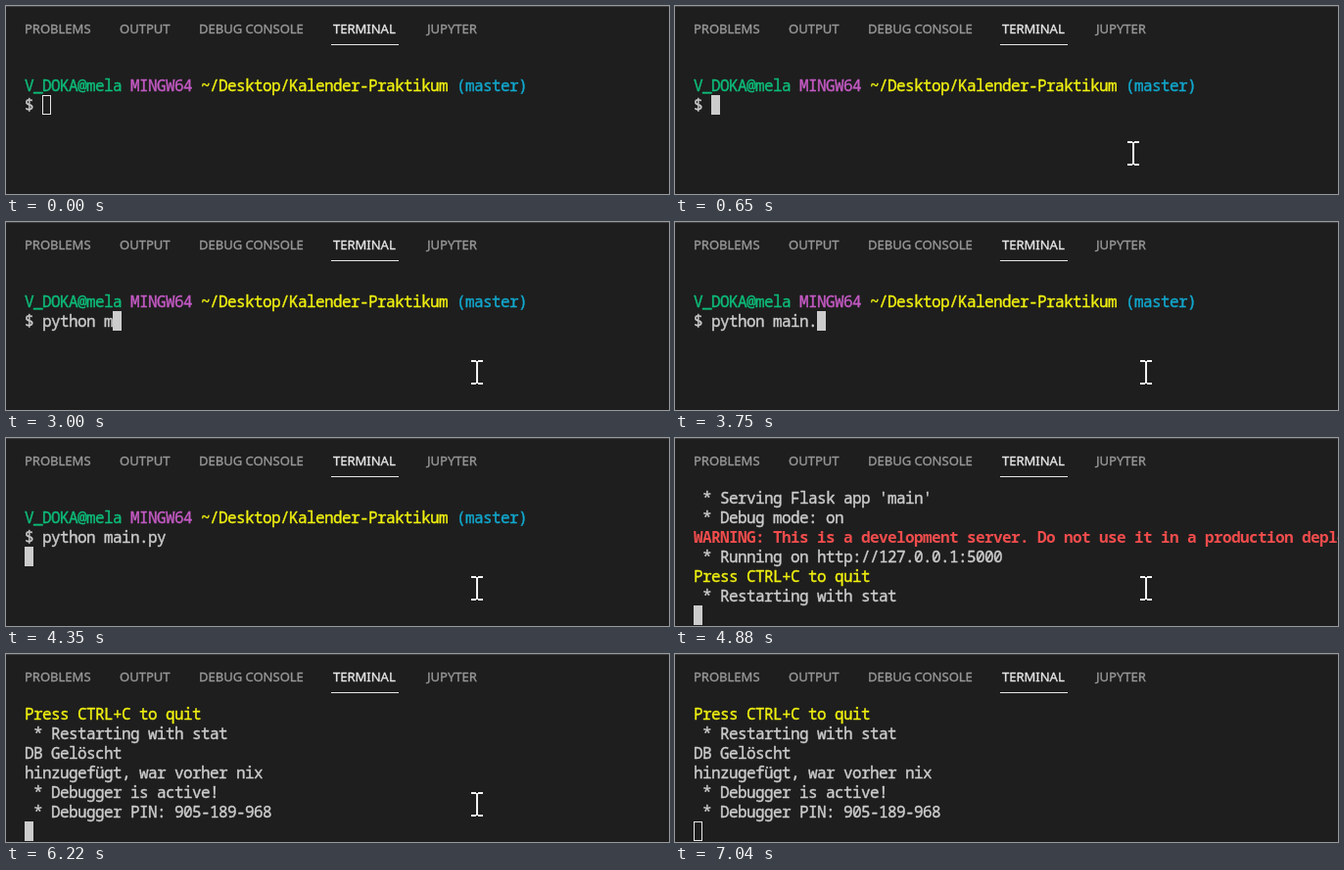
Animation of 677 by 192 pixels, one loop 7.11 s. Source, as an HTML page with a canvas:

```html
<!DOCTYPE html>
<html lang="en">
<head>
<meta charset="utf-8">
<title>Terminal</title>
<style>
  html, body { margin: 0; width: 677px; height: 192px; overflow: hidden; background: #1e1e1e; }
  canvas { display: block; }
</style>
</head>
<body>
<canvas id="stage" width="677" height="192"></canvas>
<script>
const ctx = document.getElementById('stage').getContext('2d');
const LOOP = 7110, LEFT = 19, TOP = 51, CELL = 9, ROW = 20, ROWS = 7;
const BG = '#1e1e1e', FG = '#cccccc', BRIGHT = '#e7e7e7', GREEN = '#0dbc79', PINK = '#c45ac4',
      YELLOW = '#f0f010', CYAN = '#11a8cd', RED = '#f14c4c';
const MONO = '16px "Noto Sans Mono", "DejaVu Sans Mono", monospace';
const SANS = '13px "Noto Sans", "Open Sans", sans-serif';

const TABS = [['PROBLEMS', 19], ['OUTPUT', 116], ['DEBUG CONSOLE', 197], ['TERMINAL', 334], ['JUPYTER', 430]];

// A line is a list of [text, colour, bold] runs.
const line = (text, color = FG, bold = false) => [[text, color, bold]];
const PROMPT = [['V_DOKA@mela ', GREEN], ['MINGW64 ', PINK],
                ['~/Desktop/Kalender-Praktikum ', YELLOW], ['(master)', CYAN]];
const COMMAND = 'python main.py';
const KEYS = [1330, 1400, 1730, 2000, 2130, 2200, 2400, 3000, 3150, 3220, 3290, 3750, 3950, 4020];
const ENTER = 4350;
const DB = [line('DB Gelöscht'), line('hinzugefügt, war vorher nix')];
const OUTPUT = [
  [4810, [...DB, line(" * Serving Flask app 'main'"), line(' * Debug mode: on')]],
  [4880, [
    line('WARNING: This is a development server. Do not use it in a production deployment.', RED, true),
    line(' * Running on http://127.0.0.1:5000'),
    line('Press CTRL+C to quit', YELLOW),
    line(' * Restarting with stat')]],
  [5290, DB],
  [5360, [line(' * Debugger is active!'), line(' * Debugger PIN: 905-189-968')]]
];
const FOCUS = [650, 7040];

// Pointer moves: start, end, from, to, easing.
const easeOut = p => 1 - (1 - p) * (1 - p);
const easeIn = p => Math.pow(p, 1.5);
const smooth = p => p * p * (3 - 2 * p);
const MOVES = [
  [310, 520, [490, 155], [468, 150], easeOut],
  [1730, 1870, [468, 150], [481, 153], smooth],
  [6220, 6500, [481, 153], [649, 186], easeIn]
];
const POINTER_GONE = 6560, TICK = 70;

function rect(x, y, w, h, color) {
  ctx.fillStyle = color;
  ctx.fillRect(x, y, w, h);
}

// A hairline stroke gives the slightly heavier screen weight.
function label(text, x, y, color, weight) {
  ctx.fillStyle = ctx.strokeStyle = color;
  ctx.lineWidth = weight;
  ctx.lineJoin = 'round';
  ctx.fillText(text, x, y);
  if (weight) ctx.strokeText(text, x, y);
}

function drawTabs() {
  ctx.font = SANS;
  for (const [name, x] of TABS) label(name, x, 28, name === 'TERMINAL' ? BRIGHT : '#979797', 0.35);
  rect(332, 39, 69, 1, BRIGHT);
}

function drawLine(runs, row) {
  let x = LEFT;
  for (const [text, color, bold] of runs) {
    ctx.font = (bold ? 'bold ' : '') + MONO;
    for (const ch of text) {
      label(ch, x, TOP + row * ROW + 16, color, bold ? 0 : 0.4);
      x += CELL;
    }
  }
}

function drawCursor(col, row, focused) {
  const x = LEFT + col * CELL, y = TOP + row * ROW;
  rect(x, y, CELL, ROW, focused ? FG : BRIGHT);
  if (!focused) rect(x + 1, y + 1, CELL - 2, ROW - 2, BG);
}

function drawTerminal(t) {
  const typed = COMMAND.slice(0, KEYS.filter(k => k <= t).length);
  const lines = [line(''), PROMPT, line('$ ' + typed)];
  for (const [at, added] of OUTPUT) if (t >= at) lines.push(...added);
  const entered = t >= ENTER;
  if (entered) lines.push(line(''));
  const shown = lines.slice(-ROWS);
  shown.forEach(drawLine);
  drawCursor(entered ? 0 : 2 + typed.length, shown.length - 1, t >= FOCUS[0] && t < FOCUS[1]);
}

function pointerAt(t) {
  const move = MOVES.filter(m => m[0] <= t).pop();
  if (!move || t >= POINTER_GONE) return null;
  const [start, end, a, b, ease] = move;
  const held = Math.floor((t - start) / TICK) * TICK;
  const p = ease(Math.min(1, held / (end - start)));
  return a.map((v, i) => Math.round(v + (b[i] - v) * p));
}

function drawPointer(x, y) {
  const color = '#f2f2f2';
  for (const dy of [-12, 11]) {
    rect(x - 6, y + dy, 5, 2, color);
    rect(x + 1, y + dy, 5, 2, color);
  }
  rect(x - 1, y - 11, 2, 23, color);
}

function draw(t) {
  rect(0, 0, 677, 192, BG);
  rect(0, 0, 677, 1, '#404040');
  drawTabs();
  drawTerminal(t);
  const pos = pointerAt(t);
  if (pos) drawPointer(...pos);
}

const begin = performance.now();
function frame() {
  draw((performance.now() - begin) % LOOP);
  requestAnimationFrame(frame);
}
frame();
</script>
</body>
</html>
```
